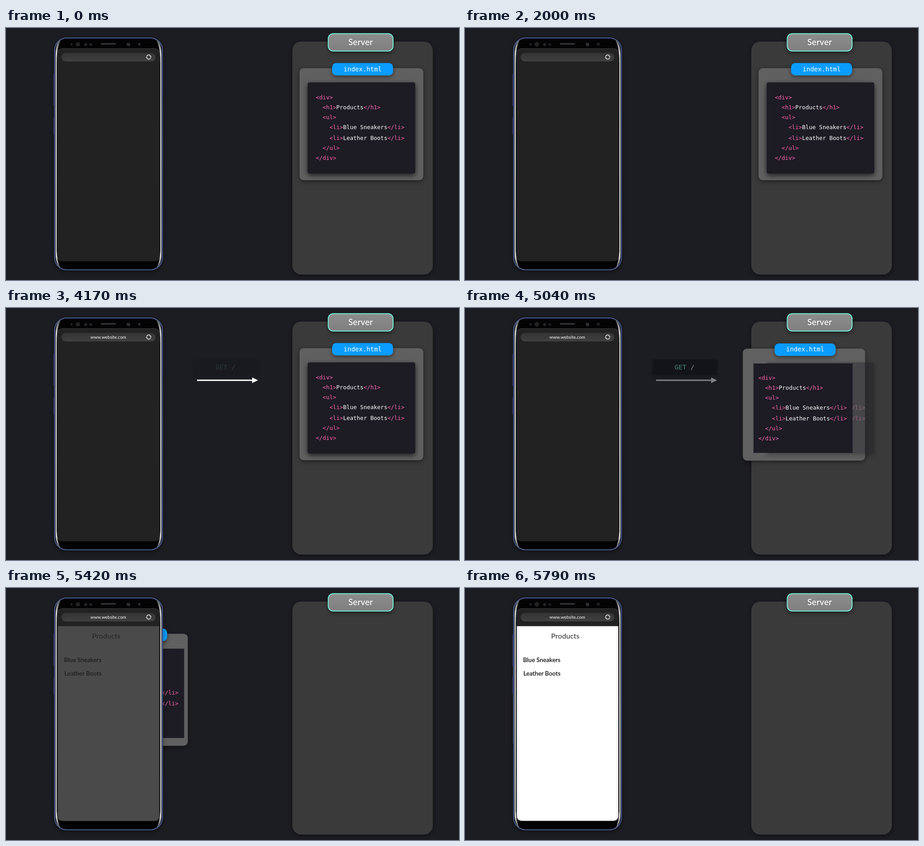
Animation of 1003 by 558 pixels, one loop 8000 ms. Source, as an HTML page:

```html
<!DOCTYPE html>
<html lang="en">
<head>
<meta charset="utf-8">
<title>Server rendered page</title>
<style>
html, body { margin: 0; width: 100%; height: 100%; overflow: hidden; background: #1c1d22; }
svg { display: block; width: 1003px; height: 558px; }
text { font-family: Lato, sans-serif; fill: #fff; }
.mono, .code text { font-family: "DejaVu Sans Mono", monospace; white-space: pre; }
.code text { font-size: 12.54px; }
.tag { fill: #f766b1; }
.mid { text-anchor: middle; }
.drop { filter: drop-shadow(0 3px 5px #0007); }
.deep { filter: drop-shadow(0 4px 6px #000b); }
</style>
</head>
<body>
<svg viewBox="0 0 1003 558">
  <defs>
    <linearGradient id="pill" x2="0" y2="1">
      <stop stop-color="#8c8c8c"/><stop offset="1" stop-color="#7f7f7f"/>
    </linearGradient>
    <linearGradient id="bar" x2="0" y2="1">
      <stop stop-color="#343434"/><stop offset="1" stop-color="#404040"/>
    </linearGradient>
    <linearGradient id="shine" x2="0" y2="1">
      <stop stop-color="#555"/><stop offset=".06" stop-color="#d8d8d8"/>
      <stop offset=".5" stop-color="#e6e6e6"/>
      <stop offset=".95" stop-color="#d8d8d8"/><stop offset="1" stop-color="#444"/>
    </linearGradient>
    <linearGradient id="paper">
      <stop stop-color="#ececec"/><stop offset=".03" stop-color="#fff"/>
      <stop offset=".97" stop-color="#fff"/><stop offset="1" stop-color="#ececec"/>
    </linearGradient>
    <g id="edge">
      <path d="M121 26Q109.8 32 109.8 60V500Q109.8 524 121 532Q113 517 112.3 494V66Q113 44 121 26Z" fill="url(#shine)"/>
      <path d="M113.5 75V496" stroke="#141414" stroke-width="1.5"/>
    </g>
  </defs>

  <rect class="drop" x="634" y="30" width="311" height="516" rx="20" fill="#3a3a3a"/>

  <g id="request" opacity="0">
    <rect class="drop" x="415" y="114" width="144" height="34" rx="3" fill="#0a0a0d"/>
    <text class="mono" x="464" y="135.8" font-size="14.6"><tspan fill="#66f5cf">GET</tspan> /</text>
  </g>
  <path id="arrow" d="M423 158.4H545V153.7L558 160L545 166.3V161.6H423Z" fill="#fff"/>

  <g class="move drop"><rect id="card" x="650" y="89" width="274" height="248" rx="9" fill="#606060"/></g>
  <g id="old">
    <rect class="deep" x="668" y="120.5" width="238" height="201.5" rx="4" fill="#1d1b24"/>
    <g id="ghost" class="code" transform="translate(4 1)"></g>
  </g>
  <g class="move">
    <rect x="675" y="122" width="220" height="198" fill="#1d1b24"/>
    <g id="code" class="code"></g>
    <rect class="drop" x="722" y="77.5" width="135" height="27.5" rx="9" fill="#0a9cfd"/>
    <text class="mono mid" x="789.7" y="95.5" font-size="14">index.html</text>
  </g>

  <g class="drop">
    <rect x="713.5" y="12.5" width="143.5" height="38.5" rx="11" fill="url(#pill)" stroke="#72efd8" stroke-width="2"/>
  </g>
  <text class="mid" x="785.2" y="37.8" font-size="18.6" font-weight="500" letter-spacing=".3">Server</text>

  <g id="phone">
    <path d="M105.5 102V172M105.5 197V236" stroke="#35305c" stroke-width="2.5"/>
    <rect class="drop" x="107.6" y="22" width="238.8" height="513.5" rx="27" fill="#030304" stroke="#5873b4" stroke-width="1.6"/>
    <rect x="109.6" y="24" width="234.8" height="509.5" rx="25" fill="none" stroke="#17181d"/>
    <rect x="112" y="45.5" width="230" height="471" rx="13" fill="#222"/>
    <path d="M114 52Q117 45.5 126 45.5H328Q337 45.5 340 52" fill="none" stroke="#3b3b3b"/>
    <g fill="#222226">
      <circle cx="145" cy="36" r="2.6"/><circle cx="159" cy="36" r="5"/>
      <circle cx="176.5" cy="36.5" r="3.6"/><circle cx="187.5" cy="36.5" r="3"/>
      <circle cx="271" cy="36.5" r="4.3"/><circle cx="295" cy="36" r="3.2"/>
      <rect x="210" y="33.3" width="33.5" height="3.8" rx="1.5" fill="#303033"/>
    </g>
    <path d="M268.5 34L271 36.5M272 38.5L274 36" stroke="#77777c"/>
    <rect x="123" y="55" width="208" height="19" rx="9.5" fill="url(#bar)"/>
    <g fill="none" stroke="#d2d2d2" stroke-width="1.7">
      <path d="M311.6 62.6A4.7 4.7 0 0 1 320.4 62.6M320.4 66A4.7 4.7 0 0 1 311.6 66"/>
      <path d="M318 63H322.8L320.6 65.6ZM314 65.6H309.2L311.4 63Z" fill="#d2d2d2" stroke="none"/>
    </g>
    <text id="url" class="mid" x="226.5" y="67.7" font-size="9.8" opacity="0">www.website.com</text>
    <g id="page" opacity="0">
      <path d="M114.5 84.5H339.5V503Q339.5 515.5 327 515.5H127Q114.5 515.5 114.5 503Z" fill="url(#paper)"/>
      <text class="mid" x="222" y="112" font-size="16" font-weight="600" style="fill:#4c4c4c">Products</text>
      <g font-size="13.4" font-weight="600">
        <text x="128.5" y="163.8" style="fill:#0c0c0c">Blue Sneakers</text>
        <text x="129.3" y="194.3" style="fill:#0c0c0c">Leather Boots</text>
      </g>
    </g>
    <use href="#edge"/>
    <use href="#edge" transform="matrix(-1 0 0 1 454 0)"/>
  </g>
</svg>
<script>
const LOOP = 8000;
const SINE = "cubic-bezier(.364,0,.636,1)";
const $$ = sel => document.querySelectorAll(sel);

// Each line: indent in characters, baseline, markup
const lines = [
  [0, 158, "<div>"],
  [2, 180, "<h1>Products</h1>"],
  [2, 202, "<ul>"],
  [4, 224, "<li>Blue Sneakers</li>"],
  [4, 248, "<li>Leather Boots</li>"],
  [2, 270, "</ul>"],
  [0, 292, "</div>"]
];

function writeCode(group) {
  for (const [indent, y, src] of lines) {
    const text = document.createElementNS("http://www.w3.org/2000/svg", "text");
    text.setAttribute("x", 686 + indent * 7.55);
    text.setAttribute("y", y);
    for (const part of src.match(/<[^>]+>|[^<]+/g)) {
      const span = document.createElementNS(text.namespaceURI, "tspan");
      if (part[0] === "<") span.setAttribute("class", "tag");
      span.textContent = part;
      text.append(span);
    }
    group.append(text);
  }
}
$$(".code").forEach(writeCode);

// steps: [ms, properties]; the first and last are held to the ends of the loop
function play(sel, steps, easing = "linear") {
  const all = [[0, steps[0][1]], ...steps, [LOOP, steps.at(-1)[1]]];
  const frames = all.map(([ms, props]) => ({ ...props, offset: ms / LOOP, easing }));
  for (const el of $$(sel)) {
    el.animate(frames, { duration: LOOP, iterations: Infinity }).startTime = 0;
  }
}
const fade = (sel, ...steps) => play(sel, steps.map(([ms, opacity]) => [ms, { opacity }]));

fade("#url", [2880, 0], [3380, 1]);
play("#arrow", [
  [3600, { clipPath: "inset(0 100% 0 0)" }],
  [4080, { clipPath: "inset(0 0% 0 0)" }]
]);
fade("#arrow", [4930, 1], [5130, 0]);
fade("#request", [4110, 0], [4560, 1], [4930, 1], [5140, 0]);
fade("#old", [4940, 1], [5100, 0]);
fade("#ghost", [4940, 0], [4941, 1]);
play(".move", [
  [4940, { transform: "translate(0px, 0px)" }],
  [5560, { transform: "translate(-568px, 14px)" }]
], SINE);
play("#card", [
  [4940, { x: "650px", width: "274px" }],
  [5560, { x: "674px", width: "226px" }]
], SINE);
fade("#page", [5340, 0], [5780, 1]);
</script>
</body>
</html>
```
